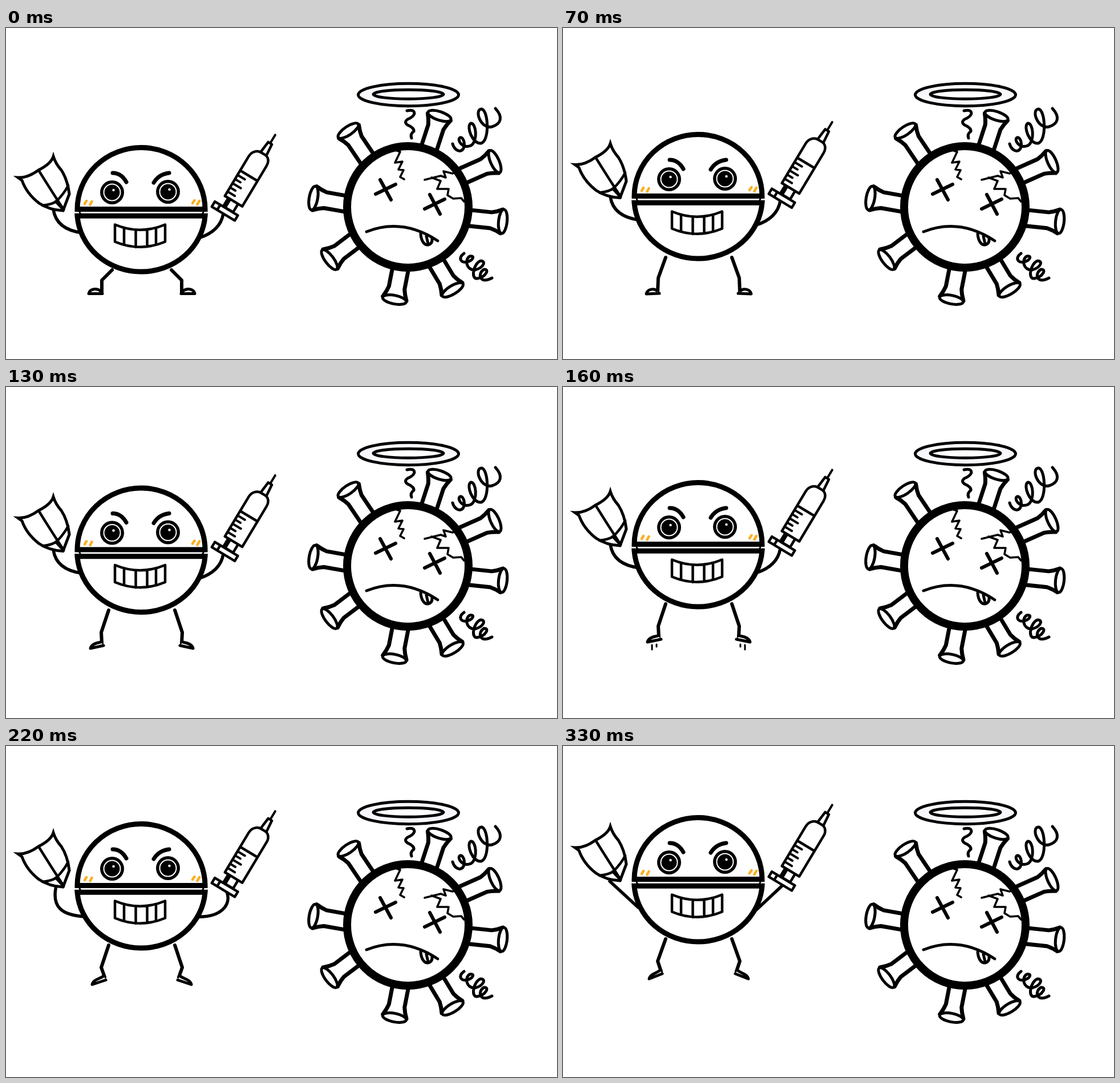
These frames come from a looping animation (966 by 580 pixels, 0.39 s). An HTML page:

```html
<!DOCTYPE html>
<html lang="en">
<head>
<meta charset="utf-8">
<title>Pill beats virus</title>
<style>
  html, body { margin: 0; width: 100%; height: 100%; overflow: hidden; background: #fff; }
  svg { display: block; width: 966px; height: 580px; }
  .ink { fill: none; stroke: #000; stroke-width: 5; stroke-linecap: round; stroke-linejoin: round; }
  .paper { fill: #fff; }
  .solid { fill: #000; stroke: none; }
  .blush { stroke: #f9b022; stroke-width: 4.5; }
</style>
</head>
<body>
<svg viewBox="0 0 966 580">
  <defs>
    <g id="spike" class="ink">
      <path class="paper" stroke-width="7" d="M-21 2Q-16 12 -14 21V64H14V21Q16 12 21 2Z"/>
      <ellipse class="paper" rx="21" ry="7.5"/>
    </g>
    <g id="eye">
      <circle r="21"/>
      <circle r="14.5" fill="none" stroke="#fff" stroke-width="2"/>
      <circle cx="2.5" cy="-4" r="2.2" fill="#fff"/>
    </g>
  </defs>

  <g id="virus" class="ink">
    <g id="spikes"></g>
    <circle class="paper" cx="704.5" cy="313.5" r="106.5" stroke-width="14"/>
    <path stroke-width="3.6" d="M677 212L691 217L682 236L695 234L688 248L697 249L691 261L698 265
      M734 266L762 259L771 262L767 251L783 255L794 249
      M746 262L762 268L756 282L776 282L774 293L784 299L798 298L803 304"/>
    <path stroke-width="6" d="M648 291L683 274M656 266L675 301M734 317L769 300M743 292L761 326"/>
    <path stroke-width="4.8" d="M632 357Q695 332 757 373"/>
    <path d="M727 361C728 374 734 381 740 380Q748 378 747 369M737 365L740 378"/>
    <ellipse cx="705.5" cy="117" rx="88" ry="19.7" fill="#f8f7fc"/>
    <ellipse class="paper" cx="705.5" cy="116.2" rx="61.5" ry="8"/>
    <path d="M703 145Q716 142 716 150Q714 156 704 160Q697 165 704 170Q716 175 715 181Q708 186 711 193"/>
    <path d="M783 203C786 214 797 220 802 211C806 202 801 190 796 192C790 196 800 212 815 206
      C828 198 824 166 815 167C806 172 818 204 833 202C848 198 846 145 834 142
      C820 142 832 178 852 173C868 168 872 156 858 141"/>
    <path d="M803 395C792 403 797 412 808 410C820 407 822 398 813 400C804 405 806 424 822 424
      C838 420 842 408 832 408C820 412 814 440 826 439C842 436 848 422 838 423C826 430 830 450 852 438"/>
  </g>

  <g class="ink" stroke-width="6">
    <g class="leg"><path class="limb" style="stroke-width:6"/><path class="foot paper"/></g>
    <g class="leg" transform="translate(476) scale(-1 1)"><path class="limb" style="stroke-width:6"/><path class="foot paper"/></g>
    <path id="drops" style="stroke-width:3" d="M156 452V460M164 451V455M311 451V455M319 452V460"/>
  </g>

  <path id="arms" class="ink" style="stroke-width:5.5"/>

  <g id="pill" class="ink">
    <g class="paper" stroke-width="9" stroke-linejoin="miter">
      <path class="paper" style="stroke-width:9" d="M125 317.5A112 108 0 0 1 349 317.5Z"/>
      <path class="paper" style="stroke-width:9" d="M125 329.3A112.3 105.5 0 0 0 349 329.3Z"/>
    </g>
    <path style="stroke-width:3" d="M128 320L131 327M347 320L344 327"/>
    <use href="#eye" class="solid" x="186" y="288"/>
    <use href="#eye" class="solid" x="284" y="287"/>
    <path style="stroke-width:7" d="M187 254Q202 254 211 270M259 271Q268 256 286 254"/>
    <path class="blush" d="M141 303L138 308M150.500 304L147.500 309.500M330.500 302L327 307M339 303L335.500 309"/>
    <path class="paper" style="stroke-width:4.500" d="M191 344.500Q235 363 279 344.500V374.500Q235 393 191 374.500Z
      M207 351V379M227.500 354V384M247.500 354V383M263 351V379"/>
  </g>

  <g id="gear" class="ink">
    <path class="paper" style="stroke-linejoin:miter" d="M21 262Q38 263 57 249Q79 238 83 225Q87 238 97 249Q108 266 111 291L100 320Q76 319 58 307Q36 290 28 267Z"/>
    <path style="stroke-width:4.500" d="M57 249Q80 286 101 318M64 311Q82 309 89 303Q102 290 109 276M87 304L101 319"/>
    <g transform="translate(444 229) rotate(31)" style="stroke-width:4.500">
      <path style="stroke-width:4" d="M2.500 -50V-33"/>
      <path class="paper" d="M-1.500 -33H6L8 -10H-4Z"/>
      <path class="paper" d="M-11 86H9V104H-11Z"/>
      <path d="M-7 88V103"/>
      <path class="paper" d="M-18 87V6C-18 -5 -10 -11 -3 -11H5C12 -11 17.500 -5 17.500 4V87ZM-18 35H17.500"/>
      <path id="ticks" style="stroke-width:4"/>
      <path class="paper" d="M-28 104.500H19V115H-28ZM-17 104.500V115"/>
    </g>
  </g>
</svg>
<script>
  const $ = id => document.getElementById(id);

  // Cap centre and outward angle of each spike
  const spikes = [
    [760, 154, 18], [600, 180, -34], [539, 298, -80], [567, 406, -127],
    [681, 476, 191], [783, 459, 149], [871, 339, 96], [857, 234, 66]
  ];
  $("spikes").innerHTML = spikes.map(([x, y, turn]) =>
    `<use href="#spike" transform="translate(${x} ${y}) rotate(${turn})"/>`).join("");

  $("ticks").setAttribute("d",
    [15, 11, 17, 11, 15].map((w, i) => `M-18 ${44 + i * 8.5}h${w}`).join(""));

  const arms = {
    bent: "M83 318Q88 353 134 359M381 325Q376 356 338 368",
    low: "M88 318C80 354 96 370 140 372M387 328C396 352 376 374 334 372",
    straight: "M82 321L132 367M384 329L339 371"
  };

  // Leg: hip, knee, ankle, heel, toe
  const steps = [
    { at: 0, pill: 0, gear: 0, arm: "bent", leg: [186, 424, 168, 442, 168, 463, 169, 465.5, 145, 465.5] },
    { at: 30, pill: -12, gear: -8, arm: "low", leg: [186, 412, 168, 441, 167, 463, 169, 465.5, 145, 465.5] },
    { at: 70, pill: -23, gear: -22.5, arm: "bent", leg: [180, 402, 167, 438, 166, 462, 169, 465, 146, 466] },
    { at: 130, pill: -32.5, gear: -32.5, arm: "bent", leg: [180, 391, 167, 430, 168, 449, 171, 453, 148, 458] },
    { at: 160, pill: -42, gear: -42, arm: "bent", leg: [180, 380, 167, 419, 168, 438, 172, 442, 148, 447], drops: true },
    { at: 190, pill: -73, gear: -73, arm: "low", leg: [180, 349, 167, 388, 173, 405, 175, 410, 151, 418] },
    { at: 240, pill: -84, gear: -84, arm: "straight", leg: [180, 338, 166, 377, 172, 395, 174, 399, 151, 408] }
  ];
  const loop = 390;

  const shift = (el, y) => el.setAttribute("transform", `translate(0 ${y})`);
  const setPaths = (selector, d) =>
    document.querySelectorAll(selector).forEach(el => el.setAttribute("d", d));

  function pose({ pill, gear, arm, leg, drops }) {
    const [hx, hy, kx, ky, ax, ay, ex, ey, tx, ty] = leg;
    shift($("pill"), pill);
    shift($("gear"), gear);
    shift($("arms"), gear);
    $("arms").setAttribute("d", arms[arm]);
    setPaths(".limb", `M${hx} ${hy}L${kx} ${ky}L${ax} ${ay}`);
    setPaths(".foot", `M${ex} ${ey}L${tx} ${ty}C${tx + 2} ${ty - 9} ${tx + 14} ${ty - 10} ${ax - 2} ${ay - 2}`);
    $("drops").style.display = drops ? "" : "none";
  }

  const start = performance.now();
  let shown;
  function tick() {
    const t = (performance.now() - start) % loop;
    const step = steps.findLast(s => s.at <= t);
    if (step !== shown) pose(shown = step);
    requestAnimationFrame(tick);
  }
  tick();
</script>
</body>
</html>
```
